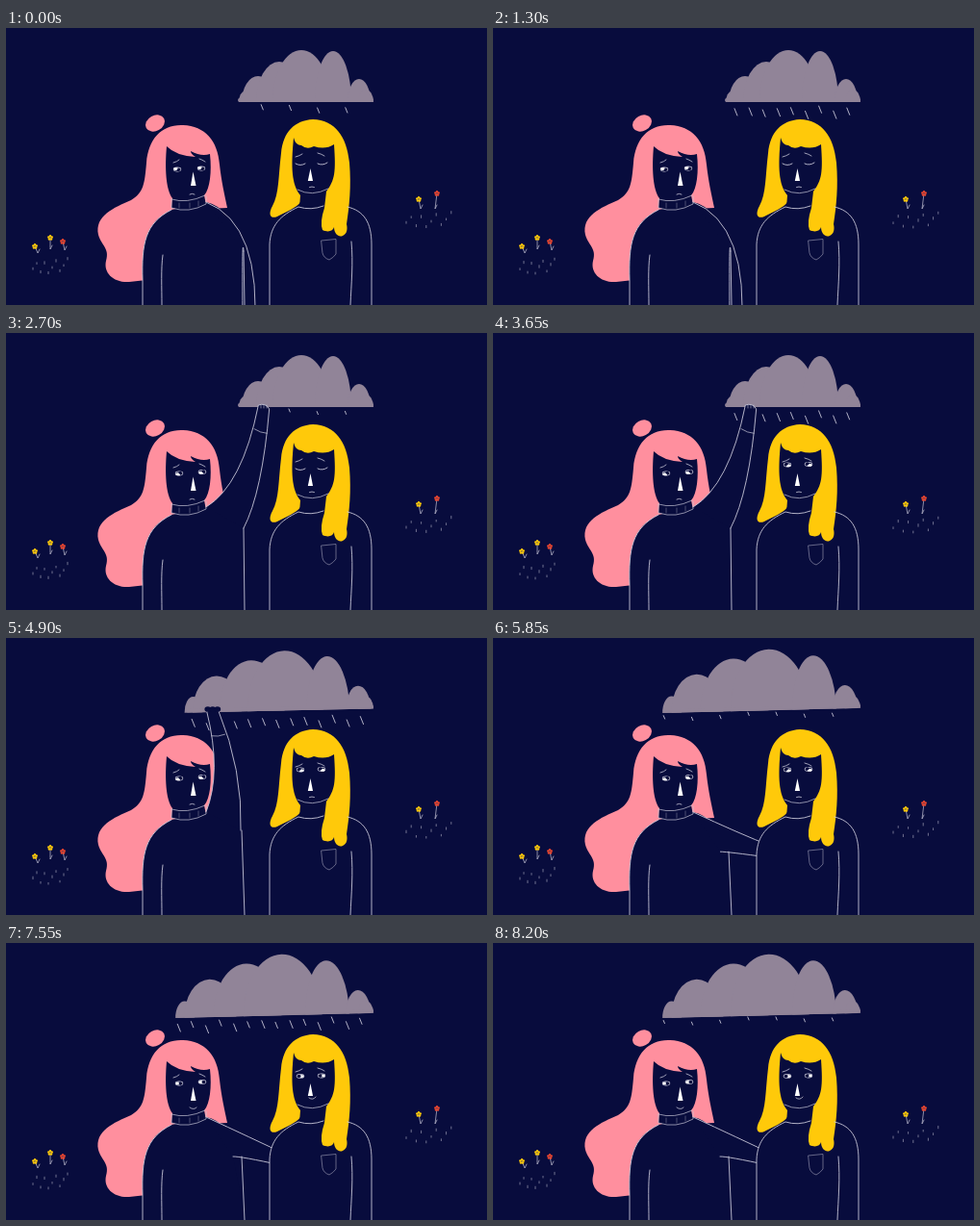
These frames come from a looping animation (500 px wide and 288 px high, 8.25 s). An HTML page with a canvas:

```html
<!DOCTYPE html>
<html lang="en">
<head>
<meta charset="utf-8">
<title>Sharing the rain</title>
<style>
html, body { margin: 0; width: 100%; height: 100%; overflow: hidden; background: #080c3d; }
canvas { display: block; width: 500px; height: 288px; }
</style>
</head>
<body>
<canvas id="stage"></canvas>
<script>
const LOOP = 8250, STEP = 50, RAIN_CYCLES = 21;
const NIGHT = '#080c3d', LINE = '#c6c5d6', DIM = '#8d8da8', CLOUD = '#918498';
const PINK = '#ff8f9e', YELLOW = '#ffc90a', RED = '#e8452f';

const canvas = document.getElementById('stage');
const ctx = canvas.getContext('2d');
const scale = window.devicePixelRatio || 1;
canvas.width = 500 * scale;
canvas.height = 288 * scale;
ctx.scale(scale, scale);
ctx.lineCap = ctx.lineJoin = 'round';

const mix = (a, b, k) => a + (b - a) * k;

function ease(t, from, to) {
  const u = Math.max(0, Math.min(1, (t - from) / (to - from)));
  return u * u * (3 - 2 * u);
}

// Evenly scattered value in 0..1
const scatter = (i, step) => (i * step + 0.3) % 1;

function fill(path, color) {
  ctx.fillStyle = color;
  ctx.fill(new Path2D(path));
}

function line(path, width = 0.9, color = LINE) {
  ctx.strokeStyle = color;
  ctx.lineWidth = width;
  ctx.stroke(new Path2D(path));
}

function oval(x, y, rx, ry, color, turn = 0, from = 0, to = 7) {
  ctx.beginPath();
  ctx.ellipse(x, y, rx, ry, turn, from, to);
  ctx.fillStyle = color;
  ctx.fill();
}

function flower(x, y, footX, footY, color) {
  line(`M${x},${y}L${footX},${footY}l2,-4`, 0.7);
  for (let i = 0; i < 5; i++) {
    const a = i * Math.PI * 0.4 - 1.57;
    oval(x + 1.8 * Math.cos(a), y + 1.8 * Math.sin(a), 1.2, 1.2, color);
  }
}

function drizzle(t, x, y, width) {
  for (let i = 0; i < 10; i++) {
    const p = (t / LOOP * RAIN_CYCLES + i * 0.37) % 1;
    const dx = scatter(i, 0.1) * width, dy = scatter(i, 0.618) * 16;
    line(`M${x + dx},${y + dy + 2 * p}v${2.6 - p}`, 0.8, DIM);
  }
}

function garden(t) {
  flower(30, 227, 33, 234, YELLOW);
  flower(46, 218, 46, 230, YELLOW);
  flower(59, 222, 61, 231, RED);
  flower(429, 178, 431, 188, YELLOW);
  flower(448, 172, 446, 188, RED);
  drizzle(t, 28, 238, 40);
  drizzle(t, 416, 190, 52);
}

// Bumps as centre, half width, height; pulling stretches those far from the right edge
const BUMPS = [[248, 6, 11], [262, 17, 27], [284, 24, 42], [307, 30, 54],
  [340, 19, 53], [367, 12, 24], [374, 8, 13]];
const baseY = (x, pull) => 77 - pull * (x - 215) * 0.025;
const cloudLeft = pull => 241 - pull * 63;

function cloud(pull) {
  const tilt = Math.atan(-0.025 * pull);
  for (const [x, w, h] of BUMPS) {
    const d = 381 - x, cx = x - pull * 0.0035 * d * d;
    oval(cx, baseY(cx, pull), w * (1 + pull * 0.0049 * d), h * (1 + pull * 3.2e-5 * d * d),
      CLOUD, tilt, Math.PI, 2 * Math.PI);
  }
  const left = cloudLeft(pull) + 2;
  line(`M${left},${baseY(left, pull) - 2}L380,${baseY(380, pull) - 2}`, 4, CLOUD);
}

function rain(t, pull) {
  const p = (t / LOOP * RAIN_CYCLES + 0.13) % 1;
  for (let i = 0, x = 369; x > cloudLeft(pull) + 1; i++, x -= 14.6) {
    const late = i % 2 ? 0 : 0.16;
    if (late && (p < 0.2 || p > 0.95)) continue;
    const u = Math.max(0, p - late);
    const len = 3 + 5 * Math.sin(Math.PI * Math.min(1, u * 1.15));
    const y = baseY(x, pull) + 3 + u * 11 + 2 * Math.sin(i * 2.4);
    line(`M${x + u * 3 - 2},${y}l${len * 0.4},${len}`, 0.9);
  }
}

// Each pose: elbow, hand, armpit
const HANG = [256, 206, 252, 320, 247, 232];
const BENT = [262, 222, 262, 150, 246, 226];
const UP   = [256, 162, 268, 77, 247, 203];
const PULL = [235, 138, 214, 76, 244, 200];
const HUG  = [249, 212, 290, 226, 236, 222];
const MOVES = [[1900, 2200, BENT], [2200, 2500, UP], [4250, 4950, PULL],
  [5150, 5500, BENT], [5500, 5900, HUG]];

const armPose = t => MOVES.reduce((pose, [from, to, next]) =>
  pose.map((v, i) => mix(v, next[i], ease(t, from, to))), HANG);

function drawArm([ex, ey, hx, hy, ax, ay], pulling) {
  const len = Math.hypot(hx - 228, hy - 192);
  const nx = (192 - hy) / len, ny = (hx - 228) / len;
  const off = (x, y, w) => `${x + nx * w},${y + ny * w}`;
  const edge = `M208,181Q${off(ex, ey, -11)} ${off(hx, hy, -6)}` +
    `Q${hx + ny * 5},${hy - nx * 5} ${off(hx, hy, 6)}Q${off(ex, ey, 11)} ${ax},${ay}`;
  fill(edge + 'Z', NIGHT);
  line(edge);
  line(`M${Math.max(ax, 245)},${ay}L248,288`);
  if (hy > 90) return;
  const wx = mix(hx, ex, 0.28), wy = hy + 25;
  line(`M${off(wx, wy, -7)}Q${wx},${wy + 2} ${off(wx, wy, 7)}`, 0.7);
  for (let i = -1; i < 2; i++) {
    if (pulling) oval(hx + i * 5, hy - 2, 3.4, 2.8, NIGHT);
    else line(`M${hx + i * 3},${hy + 1}v-3`, 0.6);
  }
}

function eye(x, y, dx, dy) {
  oval(x, y, 4.2, 2.4, LINE);
  oval(x, y, 3.5, 1.8, NIGHT);
  oval(x - dx, y - dy, 2.6, 1.5, '#fff');
  oval(x + dx, y + dy, 1.6, 1.6, NIGHT);
}

function pinkGirl(t, pose) {
  const sad = t < 1850, happy = t >= 5950;
  oval(155, 99, 10.5, 8, PINK, -0.5);
  fill('M184,101C162,100 148,115 146,140C144,163 143,171 130,179C112,187 92,195 96,215' +
    'C99,226 108,229 104,242C101,255 112,265 128,264L146,262L160,205L208,188' +
    'L230,187C227,172 224,160 222,142C220,117 207,102 184,101Z', PINK);
  fill(`M142,288V262C141,225 144,203 172,189L208,181Q232,185 ${pose[4]},${pose[5]}L249,288Z`, NIGHT);
  fill('M167,123Q177,133 197,134Q192,131 192,128Q203,134 212,131C214,150 212,167 206,174' +
    'L208,184Q190,192 172,187L173,177C166,168 165,145 167,123Z', NIGHT);
  line('M142,288V262C141,225 144,203 172,189');
  line('M162,288C162,270 161,250 163,236');
  line('M172,178Q188,183 207,174M172,178V187Q190,193 208,183V175', 0.7);
  line('M180,182v5M191,182v5M200,180v5', 0.5, DIM);

  if (sad) {
    eye(178, 147, 1.3, 0.5);
    eye(203, 146, 1.3, 0.5);
  } else {
    eye(180, 146, 1.2, happy ? 0 : -0.7);
    eye(204, 144.5, 1.2, happy ? 0 : -0.7);
  }
  line('M174,140Q178,139 180,137M201,136Q204,137 207,139', 0.8);
  fill('M194.5,149.5L192,164H197.5Z', '#fff');
  line(happy ? 'M191,171Q195,174 198,171' : 'M191,173Q193.5,171.5 196,173', 0.8);
  drawArm(pose, t > 4250 && t < 5150);
}

function yellowGirl(t) {
  const closed = t < 3100, happy = t >= 6050;
  fill('M274,288V225C275,205 285,195 303,187H345C370,190 380,200 380,225V288Z', NIGHT);
  fill('M319,95C300,96 288,108 286,130C283,155 284,172 277,185C272,194 275,199 282,196' +
    'C291,191 302,187 306,181L331,187Q326,202 329,210C335,213 340,211 341,207' +
    'C341,214 346,218 350,216C355,214 355,208 354,204C357,185 359,165 357,140' +
    'C354,112 342,96 319,95Z', YELLOW);
  fill('M299,114Q301,122 307,122Q313,127 320,123Q332,127 341,121C343,150 342,158 333,170' +
    'L331,187H305L306,174C297,163 296,145 299,114Z', NIGHT);
  line('M274,288V225C275,205 285,195 304,186Q317,190 330,185');
  line('M355,186C372,190 380,202 380,225V288');
  line('M359,222C361,245 359,265 358,288');
  line('M303,168Q318,176 335,167', 0.7);
  line('M328,221L343,219.5V235Q340,239 336,241Q330,239 329,234Z', 0.7, DIM);

  if (closed) {
    line('M301,141Q306,144 311,141M324,141Q329,143.5 334,140');
  } else {
    const y = happy ? 138.5 : 137, look = happy ? 0 : -0.7;
    eye(306, y, -1.1, look);
    eye(328, y - 0.5, -1.1, look);
  }
  line('M301,134Q305,133 308,131M324,130Q328,131 331,133', 0.8);
  fill('M316.5,146L313.8,159H319Z', '#fff');
  line(happy ? 'M315,161Q319,164 322,160' : 'M315.5,165.5Q318,164.5 320.5,165.5', 0.8);
}

function draw(t) {
  ctx.fillStyle = NIGHT;
  ctx.fillRect(0, 0, 500, 288);
  const pull = 0.87 * ease(t, 4250, 4950) + 0.13 * ease(t, 4950, 5150);
  garden(t);
  rain(t, pull);
  cloud(pull);
  pinkGirl(t, armPose(t));
  yellowGirl(t);
}

const start = performance.now();
function tick() {
  const t = (performance.now() - start) % LOOP;
  draw(Math.floor(t / STEP) * STEP);
  requestAnimationFrame(tick);
}
tick();
</script>
</body>
</html>
```
